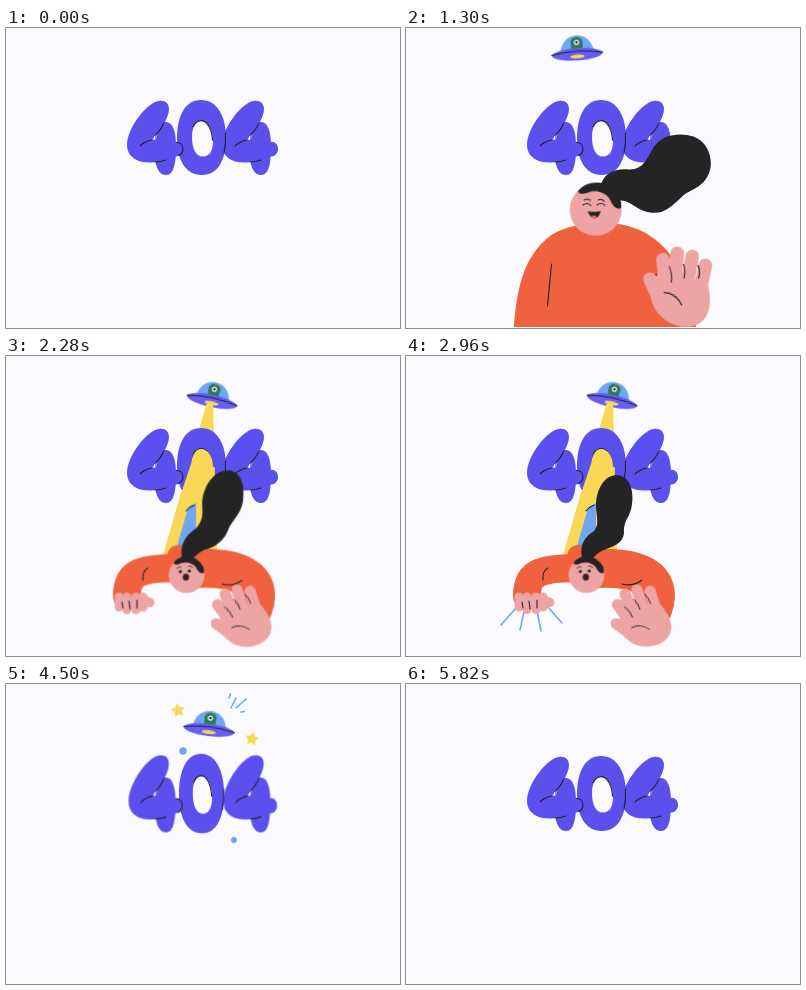
Write an HTML page that moves like this. It is 394 px wide and 300 px high and loops after 6580 ms.

```html
<!DOCTYPE html>
<html lang="en">
<head>
<meta charset="utf-8">
<title>404</title>
<style>
html, body { margin: 0; width: 100%; height: 100%; overflow: hidden; background: #fbfbff; }
svg { display: block; width: 100%; height: 100%; }
svg * { animation: 6.58s ease-in-out infinite; }
.violet { fill: #5a50ee; }
.sky { fill: #6ea6f3; }
.orange { fill: #f0613f; }
.pink { fill: #eca4a4; }
.ink { fill: #242424; }
.gold { fill: #fbd757; }
.line { fill: none; stroke: #242424; stroke-width: 1.1; stroke-linecap: round; }
.dash { fill: none; stroke: #6ea6f3; stroke-width: 1.6; stroke-linecap: round; }
.limb { fill: none; stroke: #f0613f; stroke-linecap: round; }
.finger { fill: none; stroke: #eca4a4; stroke-width: 13.5px; stroke-linecap: round; }
.thin { stroke-width: 9px; }

/* Digits */
.zero { transform-origin: 195.5px 109.5px; animation-name: zero; }
#four1 { transform-origin: 160px 110px; animation-name: four; }
#four2 { transform-origin: 250px 110px; animation-name: four; }
@keyframes zero {
  0%, 10% { transform: none; }
  13.07% { transform: scale(1.07, .93); }
  16% { transform: scale(.96, 1.03); }
  19%, 63.5% { transform: none; }
  65.7% { transform: scale(1.08, .92); }
  68.39% { transform: scale(.92, 1.06); }
  72% { transform: scale(1.04, .97); }
  76% { transform: scale(.98, 1.02); }
  80%, 100% { transform: none; }
}
@keyframes four {
  0%, 10% { transform: none; }
  13.07% { transform: scale(1.03, .98); }
  16% { transform: scale(.98, 1.02); }
  19%, 63.8% { transform: none; }
  66% { transform: scale(1.04, .97); }
  68.39% { transform: scale(.96, 1.04); }
  72.5% { transform: scale(1.02, .98); }
  77%, 100% { transform: none; }
}

/* Saucer */
#ufo { animation-name: ufo; }
@keyframes ufo {
  0%, 3.95% { transform: translate(-30px, 38px) rotate(-8deg); animation-timing-function: ease-out; }
  13.07% { transform: translate(135px, 23px) rotate(7deg); }
  18.5% { transform: translate(168px, 26px) rotate(-5deg); }
  24% { transform: translate(198px, 29px) rotate(5deg); }
  27.05% { transform: translate(204px, 45px) rotate(2deg); }
  34%, 63% { transform: translate(206px, 45px) rotate(12deg); }
  68.39% { transform: translate(203px, 46px) rotate(7deg); }
  75% { transform: translate(201px, 45px) rotate(-4deg); animation-timing-function: ease-in; }
  83.9% { transform: translate(338px, 36px) rotate(-8deg); animation-timing-function: linear; }
  88%, 100% { transform: translate(430px, 34px) rotate(-8deg); }
}
.beam { animation-name: beam; }
@keyframes beam {
  0%, 25.5% { d: path("M203 46H205L205 46H203Z"); }
  27.05% { d: path("M201 46H207L208 84H191Z"); }
  30.5%, 62.8% { d: path("M201 46H207L211 200H157Z"); }
  65%, 100% { d: path("M203 46H205L205 46H203Z"); }
}

/* Waving */
#wave { animation-name: rise; }
@keyframes rise {
  0%, 5.3% { transform: translateY(200px); animation-timing-function: ease-out; opacity: 1; }
  11.5% { transform: translateY(-4px); }
  13.07%, 31.59% { transform: none; opacity: 1; }
  31.6%, 100% { transform: none; opacity: 0; }
}
#body { animation-name: body; }
@keyframes body {
  0%, 13.07%, 22.39% { d: path("M109 299C113 262 118 230 142 208C168 193 215 190 240 206C264 220 278 242 284 299Z"); }
  17.73%, 27.05%, 28% { d: path("M107 299C110 262 115 228 148 206C175 190 222 190 248 210C272 226 288 262 294 299Z"); }
  31.6%, 100% { d: path("M108 250C104 222 118 198 150 198C175 190 222 190 245 200C268 212 276 240 270 262Z"); }
}
.sleeve { animation-name: sleeve; }
@keyframes sleeve {
  0%, 28% { opacity: 1; }
  29.5%, 100% { opacity: 0; }
}
#head { animation-name: head; }
@keyframes head {
  0%, 13.07%, 22.39% { transform: translate(190px, 186px); }
  17.73%, 27.05%, 28% { transform: translate(189.5px, 179px) rotate(6deg); }
  31.6%, 100% { transform: translate(181px, 217px) scale(.76); }
}
#hand { animation-name: hand; }
@keyframes hand {
  0%, 13.07%, 22.39% { transform: translate(281px, 269px) rotate(40deg) scale(1.03); }
  17.73%, 27.05%, 28% { transform: translate(260px, 270px); }
  31.6%, 100% { transform: translate(238px, 270px) rotate(-14deg) scale(.88); }
}
#tail { animation-name: tail; }
@keyframes tail {
  0%, 13.07%, 21% { d: path("M195 168C193 150 206 142 222 143C240 146 243 132 250 122C260 109 278 109 290 113C305 119 309 138 304 150C298 165 284 167 276 174C266 184 258 190 246 188C230 186 222 170 212 176Z"); }
  17%, 27.05% { d: path("M192 160C192 143 200 136 214 134.5C229 132 233 121 238 107C244 92 262 86 277 89.500C296 94 303 112 299 125C295 139 285 139 278 145C268 152 261 171 246 171C230 173 222 164 208 162Z"); }
  31.6%, 100% { d: path("M176 202C173 186 182 178 190 172C200 162 196 152 197 144C199 128 210 112 226 114C238 117 240 132 238 146C235 160 226 165 222 175C216 188 205 192 198 194C192 197 188 201 184 207Z"); }
}

/* Holding on */
#cling { animation-name: cling; }
@keyframes cling {
  0%, 31.59% { opacity: 0; transform: translate(-8px, -10px) scale(1.05); }
  31.6% { opacity: 1; transform: translate(-8px, -10px) scale(1.05); }
  35%, 59% { opacity: 1; transform: none; animation-timing-function: ease-in; }
  63.5% { opacity: 1; transform: translate(196px, 104px) scale(0); }
  63.6%, 100% { opacity: 0; transform: translate(196px, 104px) scale(0); }
}
#armL { animation-name: armL; }
@keyframes armL {
  0%, 44.98% { d: path("M121 240C121 215 135 212 178 212"); stroke-width: 28px; }
  58.36%, 100% { d: path("M136 226C136 200 150 192 178 192"); stroke-width: 25px; }
}
#armR { animation-name: armR; }
@keyframes armR {
  0%, 44.98% { d: path("M182 213C232 209 258 222 247 252"); stroke-width: 39px; }
  58.36%, 100% { d: path("M184 192C225 194 243 220 244 246"); stroke-width: 29px; }
}
#folds { animation-name: folds; }
@keyframes folds {
  0%, 44.98% { d: path("M137 224Q136 215 142 212M216 228Q227 231 236 224"); }
  58.36%, 100% { d: path("M151 208Q150 199 155 195M215 204Q225 206 233 200"); }
}
#clingHead { animation-name: clingHead; }
@keyframes clingHead {
  0%, 44.98% { transform: translate(180.5px, 219px) scale(.69); }
  58.36%, 100% { transform: translate(186px, 196px) scale(.6); }
}
#paw { animation-name: paw; }
@keyframes paw {
  0%, 44.98% { transform: translate(126px, 247px); }
  58.36%, 100% { transform: translate(138.5px, 231px) scale(.9); }
}
#palm { animation-name: palm; }
@keyframes palm {
  0%, 44.98% { transform: translate(235px, 271px) rotate(-14deg) scale(.83); }
  58.36%, 100% { transform: translate(238px, 264px) rotate(18deg) scale(.7); }
}
#clingTail { animation-name: clingTail; }
@keyframes clingTail {
  0%, 31.6% { d: path("M176 202C173 186 182 178 190 172C200 162 196 152 197 144C199 128 210 112 226 114C238 117 240 132 238 146C235 160 226 165 222 175C216 188 205 192 198 194C192 197 188 201 184 207Z"); }
  44.98% { d: path("M176 202C173 188 180 180 188 175C194 168 190 160 190 150C190 134 198 119 211 119C223 120 228 132 226 148C225 160 217 165 218 176C218 188 205 191 198 194C190 197 186 203 184 207Z"); }
  58.36%, 100% { d: path("M180 184C177 168 184 160 183 150C182 144 179 138 179 130C178 120 184 112 194 112C205 112 211 120 210 134C209 143 213 150 211 156C208 168 196 166 194 174C193 178 194 181 193 184Z"); }
}
#legs { animation-name: legs; }
@keyframes legs {
  0%, 44.98% { transform: none; }
  58.36%, 100% { transform: translate(6px, -12px); }
}
#scratch { animation-name: scratch; }
@keyframes scratch {
  0%, 35% { d: path("M110 252L109 253M118 256L118 257M131 255L131 256M141 250L142 251"); opacity: 0; }
  36% { opacity: 1; }
  44.98% { d: path("M110 252L95 269M118 256L114 274M131 255L135 275M141 250L156 267"); }
  58.36% { d: path("M124 231L100 266M127 235L119 273M138 240L140 274M148 236L161 265"); opacity: 1; }
  60.5%, 100% { d: path("M126 215L112 246M130 218L124 250M139 222L140 252M146 218L154 244"); opacity: 0; }
}

/* Bursts */
#hello { transform-origin: 195px 130px; animation-name: hello; }
@keyframes hello {
  0%, 9.5% { transform: scale(.5); animation-timing-function: ease-out; }
  13.07% { transform: none; }
  18%, 100% { transform: scale(1.03); }
}
#hello .bit { animation-name: bit1; }
@keyframes bit1 {
  0%, 9.5% { transform: scale(0); }
  12%, 13.5% { transform: none; }
  18%, 100% { transform: scale(0); }
}
#bye { transform-origin: 198px 85px; animation-name: bye; }
@keyframes bye {
  0%, 64.5% { transform: scale(.4); animation-timing-function: ease-out; }
  68.39% { transform: none; }
  73.5%, 100% { transform: scale(1.04); }
}
#bye .bit { animation-name: bit2; }
@keyframes bit2 {
  0%, 64.5% { transform: scale(0); }
  67.5%, 69% { transform: none; }
  73.5%, 100% { transform: scale(0); }
}
</style>
</head>
<body>
<svg viewBox="0 0 394 300">
  <defs>
    <g id="four">
      <path class="violet" d="M151 99C154 95 157 94 160 94C167 94 170 104 170 118C170 135 168 147 160 147C153 147 150 140 149 130Z"/>
      <path class="violet" fill-rule="evenodd" d="M163 81C163 73 156 71 149 74C138 79 121 101 121 117C121 129 131 135 145 134.500C153 134 162 130 169 128.500C174 129 177 125 177 121C177 117 174 113 169 114C163 116 157 113 151 111L149 107C156 100 163 89 163 81ZM149 107L146.500 112L149.500 111.500Z"/>
      <path class="line" d="M158 95Q154 103 149 107.500M134 118Q139 113 146 112M149 134Q155 134 160 132"/>
    </g>
    <g id="palmShape">
      <path class="finger" d="M-8 12L-28 -11M-8 -2L-21 -33M-2 0L-9 -43M10 0L6 -44M23 0L21 -39"/>
      <path class="pink" d="M-20 -20L27 -24C35 -12 39 4 34 13C27 28 2 30 -13 18C-21 11 -27 0 -27 -10Z"/>
      <path class="line" d="M-13 -28Q-8 -22 -7 -14M0 -34Q4 -28 4 -21M14 -37Q18 -32 18 -25M-11 -2Q0 -5 9 5"/>
    </g>
    <g id="skull">
      <circle class="pink" r="26"/>
      <path class="ink" d="M-19 -17C-15 -24 -6 -28 4 -27C20 -24 27 -10 25 -3C20 -1 16 -6 13 -12C8 -18 -1 -20 -8 -17C-12 -15 -17 -14 -19 -17Z"/>
    </g>
    <path id="star" class="gold" stroke="#fbd757" stroke-width="2" stroke-linejoin="round" d="M0 -8L2.400 -3.200L7.600 -2.500L3.800 1.200L4.700 6.500L0 4L-4.700 6.500L-3.800 1.200L-7.600 -2.500L-2.400 -3.200Z"/>
    <clipPath id="front"><path d="M185 108C187 98 190 93 195 93C202 93 207 101 207 111H260V300H120Z"/></clipPath>
  </defs>

  <g id="ufo">
    <path class="sky" d="M-17 -2C-15 -14 -8 -19 0 -19C8 -19 15 -14 17 -2Z"/>
    <path fill="#2b7a52" d="M-5.500 -5L-6 -12C-6 -19 6 -19 6 -12L5.500 -5Z"/>
    <circle cy="-12" r="2.600" fill="#fff"/>
    <circle cy="-12" r="1.300" class="ink"/>
    <path fill="#655df5" d="M-25.500 -1C-17 -8 17 -8 25.500 -1C27 8.500 -27 8.500 -25.500 -1Z"/>
    <path class="line" d="M-25.500 -.5Q0 -6 25.500 -.5"/>
    <ellipse class="gold" cy="2.200" rx="7" ry="1.900"/>
  </g>
  <path class="beam gold" d="M203 46H205L205 46H203Z"/>

  <g class="zero">
    <path class="violet" fill-rule="evenodd" d="M195 72C211 72 220 88 220 109C220 132 212 147 196 147C179 147 171 131 171 110C171 88 179 72 195 72ZM195 93C190 93 186 99 186 109C186 121 190 128.500 197 128.500C204 128.500 207 122 207 113C207 102 202 93 195 93Z"/>
    <path class="line" d="M187 98.500C191 91 198 91 202 97Q206 103 206.500 112"/>
  </g>
  <g id="four1"><use href="#four"/><path class="line" d="M171 114.500C179 115 178 125 173 127.500"/></g>
  <g id="four2"><use href="#four" x="95"/></g>
  <g class="zero"><path class="line" d="M219.500 105Q220 116 218 125"/></g>
  <g clip-path="url(#front)"><path class="beam gold" d="M203 46H205L205 46H203Z"/></g>

  <g id="cling">
    <path id="scratch" class="dash"/>
    <g id="legs">
      <path class="sky" d="M182 152L190 147V190H171Z"/>
      <path class="line" stroke-width="2" d="M180 155Q183 151 188 149"/>
      <path class="orange" d="M161 202C161 190 170 187 180 190L200 194V208H161Z"/>
    </g>
    <path id="armL" class="limb"/>
    <path id="armR" class="limb"/>
    <path id="folds" class="line"/>
    <g id="paw">
      <path class="finger thin" d="M-13 -6V4M-5 -6V6.500M4 -6V6.500M11 -6V4M12 -3L18 -.5"/>
      <path class="line" d="M-10 -1L-9 5M-3 -2L-2 6M5 -3V5"/>
    </g>
    <g id="palm"><use href="#palmShape"/></g>
    <path id="clingTail" class="ink"/>
    <g id="clingHead">
      <use href="#skull"/>
      <circle class="ink" cx="-9" cy="-5" r="2.200"/>
      <circle class="ink" cx="4" cy="-6" r="2.200"/>
      <ellipse class="ink" cx="-1" cy="3" rx="4.500" ry="5"/>
      <path class="line" d="M-14 -10Q-11 -13 -8 -12M3 -13Q6 -14 9 -11"/>
    </g>
  </g>

  <g id="wave">
    <path id="tail" class="ink"/>
    <path id="body" class="orange"/>
    <path class="line sleeve" d="M145.500 236L141.500 278M250 246Q254 268 255 288"/>
    <g id="head">
      <use href="#skull"/>
      <path class="line" d="M-13 -4Q-9 -7 -5 -4M1 -5Q5 -8 9 -5M-12 -9Q-9 -11 -6 -9M2 -10Q5 -12 8 -9"/>
      <path class="ink" d="M-8 2Q-2 3 5 1Q4 8.500 -1 8.500Q-6 7 -8 2Z"/>
      <ellipse cx="-1" cy="7" rx="2.600" ry="1.200" fill="#ee5a45"/>
    </g>
    <g id="hand"><use href="#palmShape"/></g>
  </g>

  <g id="hello">
    <g transform="translate(124 198) rotate(12)"><use class="bit" href="#star"/></g>
    <g transform="translate(101 131)"><circle class="bit sky" r="3.500"/></g>
    <g transform="translate(284.500 97)"><circle class="bit gold" r="2"/></g>
    <g transform="translate(123 77)"><path class="bit dash" d="M-5.500 3.500L-.5 4.500M3 -8.500L5 -5"/></g>
  </g>
  <g id="bye">
    <g transform="translate(172 26.500) rotate(-10) scale(.74)"><use class="bit" href="#star"/></g>
    <g transform="translate(246 55) rotate(10) scale(.74)"><use class="bit" href="#star"/></g>
    <g transform="translate(177 67)"><circle class="bit sky" r="3.700"/></g>
    <g transform="translate(228 156)"><circle class="bit sky" r="2.900"/></g>
    <g transform="translate(230 20)"><path class="bit dash" d="M-7 -6L-5.500 -10M-5 4L0 -6M0 4L10 -5M5 8L8.500 7.500"/></g>
  </g>
</svg>
</body>
</html>
```
